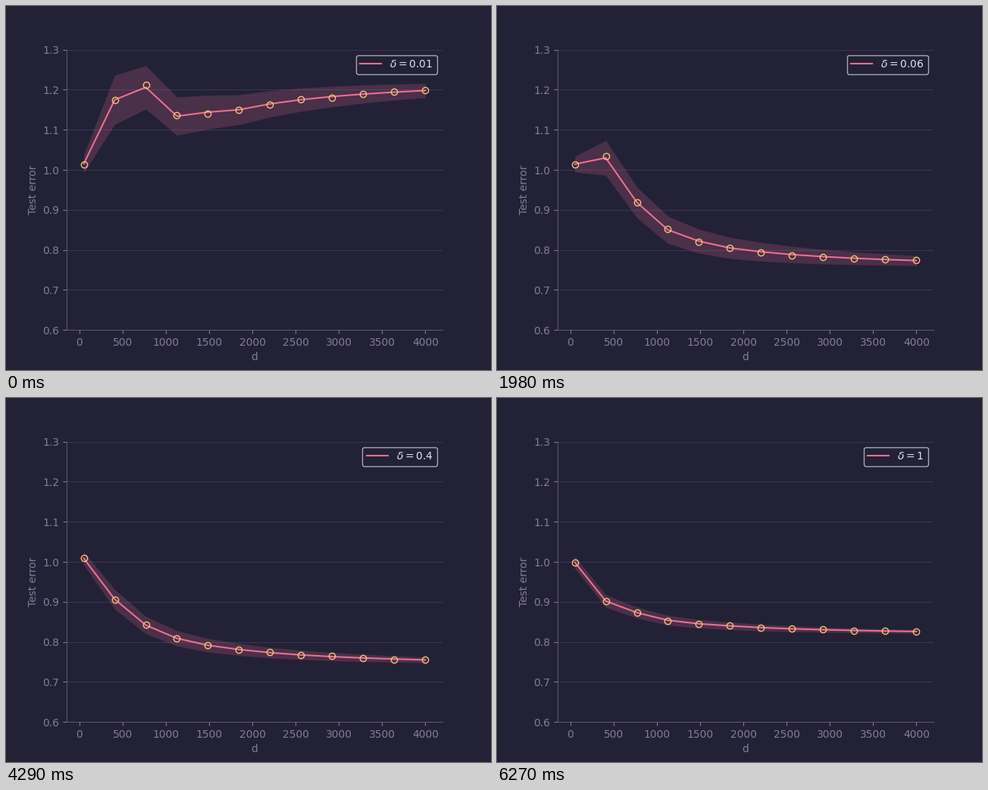
Animation, 640 px wide and 480 px high, one loop 9600 ms. Source, as a matplotlib script:

```python
import numpy as np
import matplotlib.pyplot as plt
from matplotlib.animation import FuncAnimation

BASE, OVERLAY, MUTED = "#232136", "#393552", "#59546d"
SUBTLE, TEXT, LOVE, GOLD = "#817c9c", "#e0def4", "#eb6f92", "#f6c177"

TICK_MS, STEP_MS, LOOP_MS = 30, 330, 9600

DELTAS = np.array([0.01, 0.015] + [k / 100 for k in range(2, 10)]
                  + [k / 10 for k in range(1, 11)])
DIMS = np.linspace(50, 4000, 12).astype(int)
STEPS = np.arange(len(DIMS))

# Key heights of the error curve: delta -> values at KEY_STEPS[1:].
KEY_STEPS = np.array([0, 1, 2, 3, 5, 11])
KEYS = {
    0.01: (1.175, 1.206, 1.134, 1.150, 1.198),
    0.02: (1.146, 1.067, 0.994, 0.966, 0.971),
    0.04: (1.070, 0.966, 0.891, 0.849, 0.826),
    0.08: (1.004, 0.892, 0.829, 0.783, 0.748),
    0.2: (0.939, 0.850, 0.804, 0.760, 0.725),
    0.6: (0.898, 0.849, 0.823, 0.804, 0.784),
    1.0: (0.902, 0.873, 0.854, 0.840, 0.826),
}


def smooth(u, rows, v):
    """Cubic Hermite curve through rows at u, sampled at v."""
    slope = np.gradient(rows, u, axis=0, edge_order=2)
    i = np.clip(np.searchsorted(u, v + 1e-9) - 1, 0, len(u) - 2)
    h = (u[i + 1] - u[i])[:, None]
    t = (v - u[i])[:, None] / h
    s = 1 - t
    return (s * s * (1 + 2 * t) * rows[i] + t * t * (3 - 2 * t) * rows[i + 1]
            + h * t * s * (s * slope[i] - t * slope[i + 1]))


def falloff(step):
    """Axis on which the tail of every curve is nearly straight."""
    return -1 / np.maximum(step, 0.5)


def mean_curves():
    start = 1.015 - 0.016 * DELTAS
    heights = smooth(np.log(list(KEYS)), np.array(list(KEYS.values())),
                     np.log(DELTAS))
    return np.array([np.interp(falloff(STEPS), falloff(KEY_STEPS), row)
                     for row in np.column_stack([start, heights])])


def spread_curves():
    log_delta = np.log(DELTAS)[:, None]
    spread = (0.0155 - 0.01 * log_delta) * np.exp(-0.125 * (STEPS - 1))
    spread[:, :1] = 0.015 - 0.0016 * log_delta
    return spread


mean, spread = mean_curves(), spread_curves()
circles = mean + 0.06 * spread * np.random.default_rng(4).normal(size=mean.shape)

plt.rcParams.update({"font.family": "DejaVu Sans", "toolbar": "None"})
fig, ax = plt.subplots(figsize=(6.4, 4.8), dpi=100, facecolor=BASE)
ax.set_facecolor(BASE)
ax.set_axisbelow(True)
ax.grid(axis="y", color=OVERLAY, linewidth=0.8)
ax.spines[["top", "right"]].set_visible(False)
ax.spines[["left", "bottom"]].set_color(MUTED)
ax.tick_params(colors=SUBTLE)
ax.set_xlabel("d", color=SUBTLE)
ax.set_ylabel("Test error", color=SUBTLE)

band = ax.fill_between(DIMS, mean[0], mean[0], color=LOVE, alpha=0.2, linewidth=0)
line, = ax.plot(DIMS, mean[0], color=LOVE, label=r"$\delta=0.01$")
dots, = ax.plot(DIMS, mean[0], "o", mfc="none", mec=GOLD)
margin = 0.05 * (DIMS[-1] - DIMS[0])
ax.set_xlim(DIMS[0] - margin, DIMS[-1] + margin)
ax.set_ylim(0.6, 1.3)
legend = ax.legend(loc="upper right", labelcolor=TEXT, facecolor=BASE)
label = legend.get_texts()[0]


def update(frame):
    k = min(frame * TICK_MS // STEP_MS, len(DELTAS) - 1)
    low, high = mean[k] - spread[k], mean[k] + spread[k]
    outline = np.column_stack([np.r_[DIMS, DIMS[::-1]], np.r_[low, high[::-1]]])
    band.set_verts([outline])
    line.set_ydata(mean[k])
    dots.set_ydata(circles[k])
    label.set_text(rf"$\delta={DELTAS[k]:g}$")
    return band, line, dots, legend


anim = FuncAnimation(fig, update, frames=LOOP_MS // TICK_MS, interval=TICK_MS,
                     repeat=True, repeat_delay=0)
plt.show()
```
